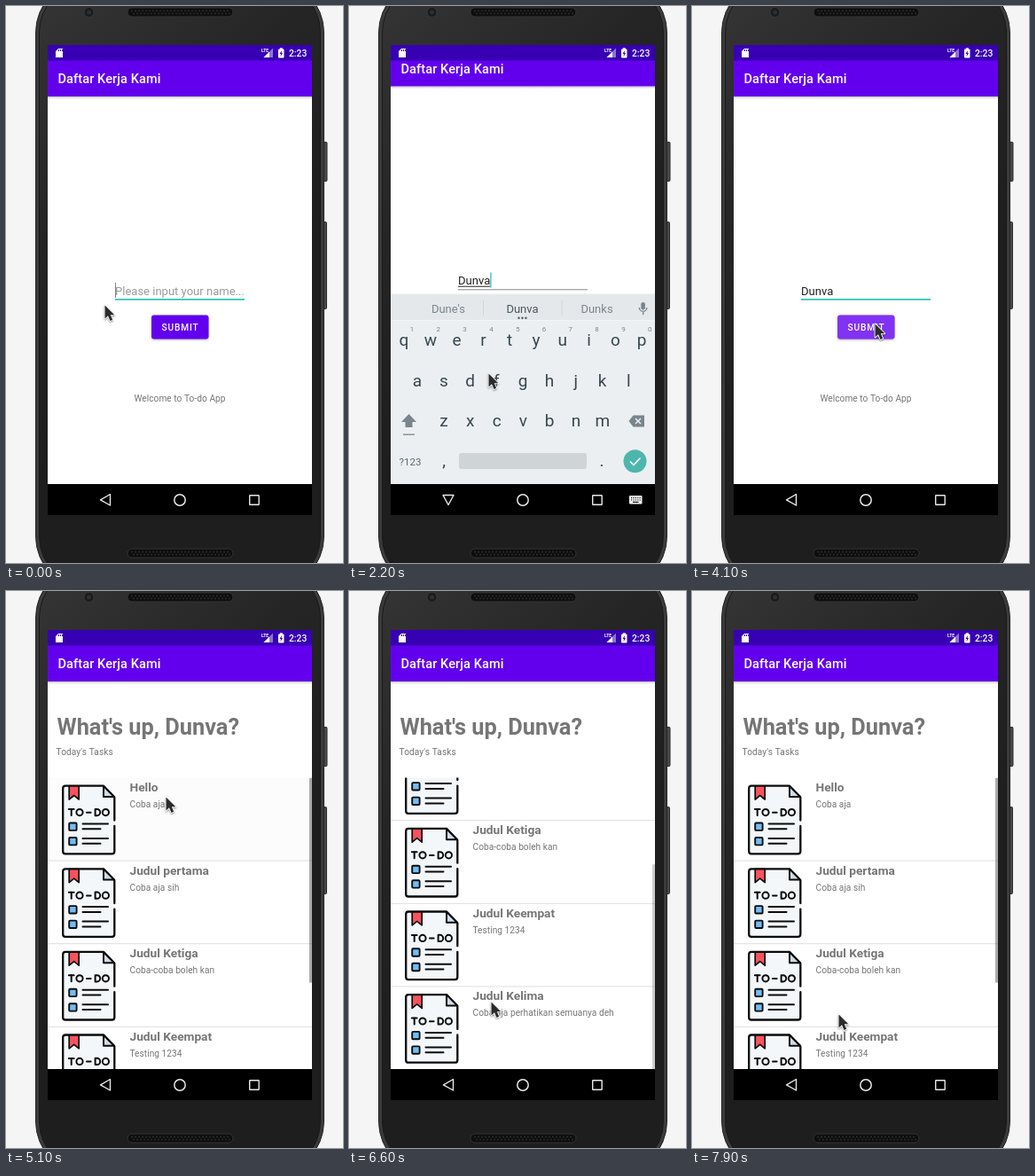
Write an HTML page with a canvas that moves like this. It is 380x628 px and loops after 8 s.

```html
<!DOCTYPE html>
<html lang="id">
<head>
<meta charset="utf-8">
<title>Todo app demo</title>
<style>
  html, body { margin: 0; width: 100%; height: 100%; overflow: hidden; background: #f5f5f5; }
  canvas { display: block; width: 380px; height: 628px; }
</style>
</head>
<body>
<canvas id="stage"></canvas>
<script>
const W = 380, H = 628, LOOP = 8000, STEP = 100;
const canvas = document.getElementById('stage');
const dpr = window.devicePixelRatio || 1;
canvas.width = W * dpr;
canvas.height = H * dpr;
const ctx = canvas.getContext('2d');

const NAME = 'Dunva', TITLE = 'Daftar Kerja Kami';
const PURPLE = '#6200ee', DARK_PURPLE = '#3700b3', TEAL = '#26c4b8', GREY = '#757575';
const LIST_TOP = 210.5, LIST_END = 539, ROW = 93.6, MAX_SCROLL = 139;

const tasks = [
  ['Hello', 'Coba aja'],
  ['Judul pertama', 'Coba aja sih'],
  ['Judul Ketiga', 'Coba-coba boleh kan'],
  ['Judul Keempat', 'Testing 1234'],
  ['Judul Kelima', 'Coba aja perhatikan semuanya deh']
];
const hints = [
  [1400, 'Do', 'D', 'Did'],
  [1500, 'Due', 'Du', 'Duty'],
  [1700, 'Dune', 'Dun', 'Dunk'],
  [1900, "Dune's", NAME, 'Dunks']
];
const keyTimes = [1200, 1500, 1600, 1800, 1900];

// time, x, y of the pointer tip
const pointerPath = [
  [100, 111, 337], [400, 150, 324], [600, 150, 324], [1000, 157, 414],
  [2200, 157, 414], [2400, 100, 587], [2600, 100, 587], [2700, 107, 558],
  [2900, 107, 558], [3400, 204, 362], [3500, 206, 358], [4600, 206, 358],
  [5100, 180, 232], [5500, 180, 180], [5600, 178, 141], [5800, 175, 372],
  [5900, 172, 430], [6200, 165, 270], [6600, 160, 463], [7000, 160, 443],
  [7200, 161, 443], [7600, 166, 583], [7900, 165, 477]
];
const scrollPath = [
  [5100, 0], [5500, 52], [5600, 91], [5700, 0], [5900, 0],
  [6200, MAX_SCROLL], [7200, MAX_SCROLL], [7600, 0]
];

const clamp = v => Math.max(0, Math.min(1, v));
const easeOut = v => 1 - (1 - v) ** 3;
const ramp = (t, a, b) => easeOut(clamp((t - a) / (b - a)));

function track(path, t, col) {
  if (t <= path[0][0]) return path[0][col];
  for (let i = 1; i < path.length; i++) {
    const a = path[i - 1], b = path[i];
    if (t <= b[0]) return a[col] + (b[col] - a[col]) * (t - a[0]) / (b[0] - a[0]);
  }
  return path[path.length - 1][col];
}

// the scrollbar fades once the list has rested for a while
function barAlpha(t) {
  let moved = scrollPath[0][0];
  for (let i = 1; i < scrollPath.length; i++) {
    const a = scrollPath[i - 1], b = scrollPath[i];
    if (t > a[0] && a[1] !== b[1]) moved = Math.min(t, b[0]);
  }
  return 1 - clamp((t - moved - 300) / 250);
}

function rect(x, y, w, h, color) {
  ctx.fillStyle = color;
  ctx.fillRect(x, y, w, h);
}

function round(x, y, w, h, r, fill, stroke, line = 1) {
  ctx.beginPath();
  ctx.roundRect(x, y, w, h, r);
  paint(fill, stroke, line);
}

function circle(x, y, r, fill, stroke, line = 1) {
  ctx.beginPath();
  ctx.arc(x, y, r, 0, Math.PI * 2);
  paint(fill, stroke, line);
}

function poly(points, fill, stroke, line = 1, open = false) {
  ctx.beginPath();
  for (let i = 0; i < points.length; i += 2) ctx.lineTo(points[i], points[i + 1]);
  if (!open) ctx.closePath();
  paint(fill, stroke, line);
}

function paint(fill, stroke, line) {
  if (fill) { ctx.fillStyle = fill; ctx.fill(); }
  if (stroke) { ctx.strokeStyle = stroke; ctx.lineWidth = line; ctx.stroke(); }
}

function text(str, x, y, size, color, { weight = 400, align = 'left', space = 0 } = {}) {
  ctx.font = `${weight} ${size}px Roboto, sans-serif`;
  ctx.letterSpacing = space + 'px';
  ctx.textAlign = align;
  ctx.fillStyle = color;
  ctx.fillText(str, x, y);
}

function clip(x, y, w, h, draw) {
  ctx.save();
  ctx.beginPath();
  ctx.rect(x, y, w, h);
  ctx.clip();
  draw();
  ctx.restore();
}

function speaker(y) {
  round(137, y, 119, 10, 5, '#0e0e0e', '#343434');
  for (let x = 142; x < 253; x += 4) {
    circle(x, y + 3.5, 1, '#2d2d2d');
    circle(x + 2, y + 6.5, 1, '#2d2d2d');
  }
}

function phone() {
  rect(0, 0, W, H, '#f5f5f5');
  round(356, 153.5, 6, 44, 1, '#4a4a4a', '#2c2c2c');
  round(356, 243.5, 5.5, 98, 1, '#4a4a4a', '#2c2c2c');
  const body = ctx.createLinearGradient(40, 0, 300, 300);
  body.addColorStop(0, '#343434');
  body.addColorStop(0.5, '#252525');
  body.addColorStop(1, '#1e1e1e');
  round(33.5, -30, 325, 688, 60, '#3b3b3b', '#242424');
  round(37.5, -26, 317, 680, 56, body, '#191919');
  speaker(2);
  speaker(612);
  circle(93.5, 7, 5.5, '#1b1b1b', '#3a3a3a');
  circle(93.5, 7, 2.5, '#2b2f36');
}

function statusBar() {
  rect(47, 44, 298, 17.5, DARK_PURPLE);
  poly([59, 48, 64, 48, 64, 58, 56, 58, 56, 51], '#fff');
  for (let x = 59; x < 64; x += 2) rect(x, 49, 1, 2, DARK_PURPLE);
  text('LTE', 288, 52, 5, '#fff', { weight: 700 });
  poly([301, 47.5, 301, 58, 290.5, 58], '#8f73d4');
  poly([297, 51.5, 297, 58, 290.5, 58], '#fff');
  round(307, 48.5, 6.5, 10, 1, '#fff');
  rect(308.8, 47.3, 3, 2, '#fff');
  poly([311, 50, 308.5, 54, 310, 54, 309.6, 57, 312, 53, 310.6, 53], DARK_PURPLE);
  text('2:23', 319, 56.5, 10.3, '#fff', { weight: 500 });
}

function appBar(y) {
  const shade = ctx.createLinearGradient(0, y + 102, 0, y + 105);
  shade.addColorStop(0, 'rgba(0,0,0,.22)');
  shade.addColorStop(1, 'rgba(0,0,0,0)');
  rect(47, y + 102, 298, 3, shade);
  rect(47, y + 61, 298, 41, PURPLE);
  text(TITLE, 58.5, y + 87, 14.5, '#fff', { weight: 500, space: 0.11 });
}

function inputScreen(t, kb) {
  const y = -11.5 * kb, open = kb > 0.5;
  const typed = NAME.slice(0, keyTimes.filter(k => t >= k).length);
  rect(47, 61, 298, 478, '#fff');
  ctx.save();
  ctx.translate(0, y);
  ctx.font = '400 13.04px Roboto, sans-serif';
  ctx.letterSpacing = '0px';
  const end = 123 + ctx.measureText(typed).width;
  if (typed) text(typed, 123, 325.5, 13.04, '#212121');
  else text('Please input your name...', 123, 325.5, 13.04, '#9a9a9a');
  if (typed && open) rect(123, 327.2, end - 123, 1, '#212121');
  if (open) rect(123, 330.8, 146, 1, '#868686');
  else rect(123, 330, 146, 1.7, TEAL);
  if (t < 400) rect(123, 312, 1, 17, '#858585');
  else if ((t >= 800 && t < 2400) || (t >= 3600 && t < 4100)) rect(end, 312, 1.3, 17, TEAL);

  ctx.save();
  ctx.shadowColor = 'rgba(0,0,0,.3)';
  ctx.shadowBlur = 2.5;
  ctx.shadowOffsetY = 1;
  round(164, 348.5, 64.5, 27, 3, PURPLE);
  ctx.restore();
  if (t >= 3800 && t < 4400) {
    clip(164, 348.5, 64.5, 27, () =>
      circle(206, 360, 50 * ramp(t, 3700, 4100), `rgba(255,255,255,${0.26 * (1 - clamp((t - 4000) / 400))})`));
  }
  text('SUBMIT', 196.5, 365.7, 10.14, '#fff', { weight: 500, align: 'center', space: 0.9 });
  text('Welcome to To-do App', 196, 446, 10.14, GREY, { align: 'center', space: 0.05 });
  ctx.restore();
  appBar(y);
  statusBar();
}

function keyboard(t, kb) {
  if (kb <= 0) return;
  clip(47, 61, 298, 478, () => {
    ctx.translate(0, 213 * (1 - kb));
    rect(47, 324.5, 298, 1.5, 'rgba(0,0,0,.08)');
    rect(47, 326, 298, 213, '#eceff1');
    rect(47, 326, 298, 28, '#e4e8eb');
    rect(47, 354, 298, 0.8, '#f5f7f8');

    const words = hints.filter(h => t >= h[0]).pop();
    if (words) {
      const mid = { align: 'center' };
      text(words[1], 112, 346, 13, '#7b868c', mid);
      text(words[2], 195.5, 346, 13, '#4b5960', mid);
      text(words[3], 279.5, 346, 13, '#7b868c', mid);
      rect(151, 332, 1, 17, '#cfd5d8');
      rect(239.5, 332, 1, 17, '#cfd5d8');
      for (let i = -1; i < 2; i++) circle(195.5 + i * 4, 351.8, 1.2, '#455a64');
    }
    // microphone
    round(329.3, 334, 4.6, 8.5, 2.3, '#78858c');
    ctx.beginPath();
    ctx.arc(331.6, 340, 4.3, 0, Math.PI);
    paint(null, '#78858c', 1.3);
    rect(331, 344, 1.3, 4, '#78858c');

    const ink = '#37474f', center = { align: 'center' };
    const row = (keys, x, y) => [...keys].forEach((k, i) => text(k, x + i * 29.8, y, 19, ink, center));
    row('qwertyuiop', 62, 383);
    row('asdfghjkl', 77, 429);
    row('zxcvbnm', 107, 474);
    [...'1234567890'].forEach((d, i) => text(d, 71 + i * 29.8, 367, 8, '#7b878d', center));

    poly([67.5, 460, 76, 469, 71.5, 469, 71.5, 475, 63.5, 475, 63.5, 469, 59, 469], '#78858c');
    rect(61, 482.5, 13, 1.3, '#78858c');
    poly([315.5, 468, 320.5, 461.5, 333, 461.5, 333, 474.5, 320.5, 474.5], '#78858c');
    poly([323, 465, 329, 471], null, '#eceff1', 1.5, true);
    poly([329, 465, 323, 471], null, '#eceff1', 1.5, true);

    text('?123', 69, 517.5, 11.5, '#5b6970', center);
    text(',', 107, 519, 19, ink, center);
    text('.', 285, 519, 19, ink, center);
    round(124, 504, 144, 18, 3, '#cfd4d7');
    circle(322.5, 513.3, 13, '#4db6ac');
    poly([317, 513.5, 321, 517.5, 328.5, 509.5], null, '#fff', 1.6, true);
  });
}

function navBar(open) {
  rect(47, 539, 298, 35, '#000');
  const back = open
    ? [106, 551.5, 118, 551.5, 112, 562.5]
    : [117.5, 550.5, 117.5, 563, 106.5, 556.8];
  ctx.lineJoin = 'round';
  poly(back, null, '#e8e8e8', 1.4);
  circle(196, 557, 6.2, null, '#e8e8e8', 1.5);
  round(274.7, 551.7, 10.5, 10.5, 0.5, null, '#e8e8e8', 1.4);
  if (open) {
    round(316, 552, 14.5, 9.5, 1, '#f2f2f2');
    for (let y = 554; y < 558; y += 2.4)
      for (let x = 318; x < 329; x += 2.4) rect(x, y, 1.1, 1.1, '#000');
    rect(320, 558.8, 6.5, 1.1, '#000');
  }
}

function paperIcon(x, y) {
  ctx.save();
  ctx.translate(x, y);
  ctx.lineJoin = ctx.lineCap = 'round';
  const ink = '#0b0b0b';
  ctx.beginPath();
  ctx.roundRect(1, 1, 58.5, 77, 3);
  ctx.save();
  ctx.clip();
  poly([0, 0, 47, 0, 60, 13, 60, 79, 0, 79], '#f3f7fa');
  ctx.restore();
  // outline with a short gap on the right edge
  ctx.beginPath();
  ctx.moveTo(59.3, 40);
  ctx.lineTo(59.3, 14);
  ctx.lineTo(47, 1.2);
  ctx.lineTo(4, 1.2);
  ctx.quadraticCurveTo(1.2, 1.2, 1.2, 4);
  ctx.lineTo(1.2, 75);
  ctx.quadraticCurveTo(1.2, 77.8, 4, 77.8);
  ctx.lineTo(56.5, 77.8);
  ctx.quadraticCurveTo(59.3, 77.8, 59.3, 75);
  ctx.lineTo(59.3, 46.5);
  paint(null, ink, 2.3);
  poly([47, 1.5, 47, 13.5, 59, 13.5], '#cfdbe6', ink, 2);
  poly([8.2, 1.5, 19.2, 1.5, 19.2, 16.5, 13.7, 12, 8.2, 16.5], '#f8525f', ink, 1.7);
  // label
  poly([7.8, 27.6, 13.6, 27.6], null, ink, 2, true);
  poly([10.7, 27.6, 10.7, 34.6], null, ink, 2, true);
  circle(20, 31.1, 3.6, null, ink, 2);
  poly([28, 31.3, 32.6, 31.3], null, ink, 2, true);
  ctx.beginPath();
  ctx.moveTo(37.6, 27.5);
  ctx.arc(39.6, 31.1, 3.6, -Math.PI / 2, Math.PI / 2);
  ctx.lineTo(37.6, 34.7);
  ctx.closePath();
  paint(null, ink, 2);
  circle(49.4, 31.1, 3.6, null, ink, 2);
  for (const top of [43, 59.5]) {
    round(8.2, top, 8.4, 8.4, 1, '#72bdf5', ink, 1.9);
    poly([23.5, top + 1, 52, top + 1], null, ink, 2, true);
    poly([23.5, top + 6.8, 43.5, top + 6.8], null, ink, 2, true);
  }
  ctx.restore();
}

function listScreen(t) {
  const scroll = track(scrollPath, t, 1);
  const pressed = t >= 5000 && t < 5200;
  rect(47, 61, 298, 478, '#fff');
  text(`What's up, ${NAME}?`, 57.5, 162, 25.35, GREY, { weight: 700 });
  text("Today's Tasks", 56.5, 185, 10.14, GREY, { space: 0.1 });
  clip(47, LIST_TOP, 298, LIST_END - LIST_TOP, () => {
    tasks.forEach(([title, note], i) => {
      const y = LIST_TOP + i * ROW - scroll;
      if (pressed && i === 0) rect(47, y, 298, ROW, '#fcfcfc');
      paperIcon(63, y + 8);
      text(title, 139.5, y + 15.5, 13.7, GREY, { weight: 700 });
      text(note, 139.5, y + 33.5, 10.14, GREY, { space: 0.05 });
      if (i < tasks.length - 1) rect(47, y + ROW - 0.5, 298, 1, '#dedede');
    });
    rect(342, LIST_TOP + scroll * 0.703, 3, 231, `rgba(0,0,0,${0.33 * barAlpha(t)})`);
  });
  appBar(0);
  statusBar();
}

function pointer(x, y) {
  ctx.save();
  ctx.translate(x, y);
  ctx.lineJoin = 'round';
  ctx.shadowColor = 'rgba(0,0,0,.35)';
  ctx.shadowBlur = 2;
  ctx.shadowOffsetY = 1;
  const arrow = [0.5, 0.5, 0.5, 15.5, 4, 12.3, 6.5, 18, 9.2, 16.8, 6.8, 11.3, 11.3, 11.3];
  poly(arrow, '#fff', '#fff', 1.8);
  ctx.shadowColor = 'transparent';
  poly(arrow, '#2b2b2b');
  ctx.restore();
}

function draw(t) {
  ctx.setTransform(dpr, 0, 0, dpr, 0, 0);
  const kb = ramp(t, 500, 900) * (1 - ramp(t, 2800, 3200));
  const enter = ramp(t, 4100, 4600);
  phone();
  clip(47, 44, 298, 530, () => {
    if (enter < 1) {
      inputScreen(t, kb);
      keyboard(t, kb);
    }
    if (enter > 0) {
      ctx.save();
      ctx.globalAlpha = enter;
      ctx.translate(0, 42 * (1 - enter));
      listScreen(t);
      ctx.restore();
    }
    navBar(t >= 600 && t < 2900);
  });
  pointer(track(pointerPath, t, 1), track(pointerPath, t, 2));
}

const start = performance.now();
function frame() {
  const t = (performance.now() - start) % LOOP;
  draw(Math.floor(t / STEP) * STEP);
  requestAnimationFrame(frame);
}
frame();
</script>
</body>
</html>
```
